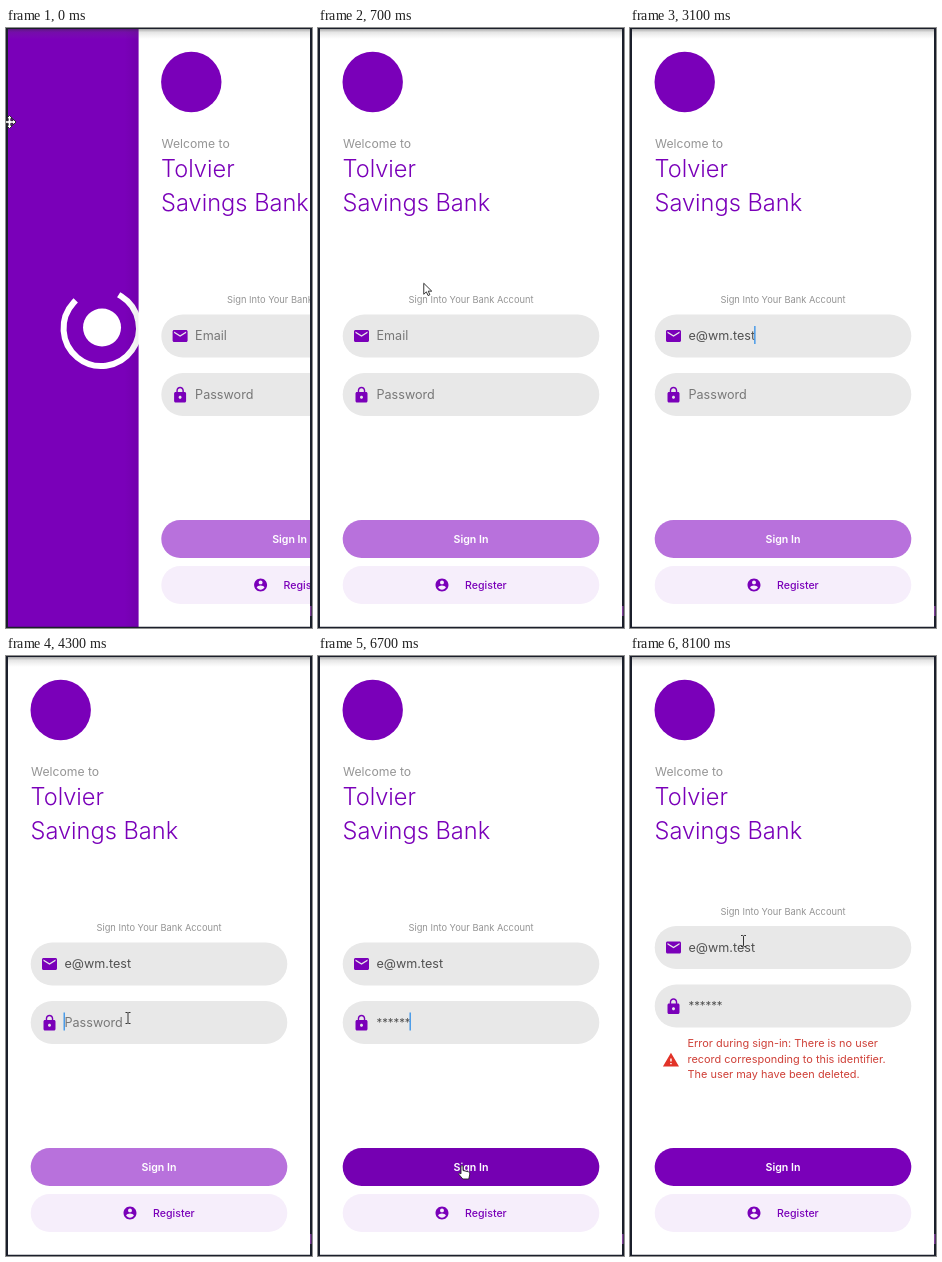
An HTML page that plays this animation: 306x600 px, repeating every 8200 ms.

```html
<!DOCTYPE html>
<html lang="en">
<head>
<meta charset="utf-8">
<title>Sign in</title>
<style>
  html, body { margin: 0; width: 100%; height: 100%; overflow: hidden; background: #fff; }
  svg { display: block; width: 306px; height: 600px; font-family: Inter, Roboto, sans-serif; }
  .accent { fill: #7a00b9; }
  .grey { fill: #959595; }
  .field { fill: #e8e8e8; }
  .title { font-size: 23.6px; font-weight: 350; }
  .input { font-size: 12.6px; }
  .error { font-size: 10.95px; fill: #cf4038; }
  .cursor path { stroke-linejoin: round; }
</style>
</head>
<body>
<svg viewBox="0 0 306 600">
  <defs>
    <linearGradient id="topShade" x2="0" y2="1">
      <stop stop-color="#222" stop-opacity=".5"/>
      <stop offset=".4" stop-color="#555" stop-opacity=".15"/>
      <stop offset="1" stop-color="#777" stop-opacity="0"/>
    </linearGradient>
    <linearGradient id="sideShade">
      <stop stop-color="#000" stop-opacity="0"/>
      <stop offset="1" stop-color="#000" stop-opacity=".07"/>
    </linearGradient>
  </defs>

  <rect class="accent" width="306" height="600"/>
  <g id="splash">
    <path id="arc" fill="none" stroke="#fff" stroke-width="6" stroke-linecap="square"/>
    <circle cx="153.5" cy="299.5" r="19" fill="#fff"/>
  </g>

  <g id="page">
    <rect x="-12" width="14" height="600" fill="url(#sideShade)"/>
    <rect x="2" width="306" height="600" fill="#fff"/>
    <circle class="accent" cx="54.7" cy="54" r="30.2"/>
    <text class="grey" x="25" y="119.5" font-size="12.2">Welcome to</text>
    <text class="accent title" x="24.5" y="149">Tolvier</text>
    <text class="accent title" x="24.5" y="183">Savings Bank</text>

    <g id="form">
      <text class="grey" x="153" y="275" font-size="9.3" text-anchor="middle">Sign Into Your Bank Account</text>
      <rect class="field" x="24.7" y="286.5" width="256.6" height="43" rx="21.5"/>
      <path class="accent" transform="translate(34.5 299) scale(.75)" d="M20 4H4c-1.1 0-2 .9-2 2v12c0 1.1.9 2 2 2h16c1.1 0 2-.9 2-2V6c0-1.1-.9-2-2-2zm0 4l-8 5-8-5V6l8 5 8-5v2z"/>
      <text class="input" id="email" x="58.5" y="312"></text>
      <rect class="field" x="24.7" y="345" width="256.6" height="43" rx="21.5"/>
      <path class="accent" transform="translate(34.5 358) scale(.75)" d="M18 8h-1V6c0-2.76-2.24-5-5-5S7 3.24 7 6v2H6c-1.1 0-2 .9-2 2v10c0 1.1.9 2 2 2h12c1.1 0 2-.9 2-2V10c0-1.1-.9-2-2-2zm-6 9c-1.1 0-2-.9-2-2s.9-2 2-2 2 .9 2 2-.9 2-2 2zm3.1-9H8.9V6c0-1.71 1.39-3.1 3.1-3.1 1.71 0 3.1 1.39 3.1 3.1v2z"/>
      <text class="input" id="password" x="58.5" y="370.5"></text>
      <rect id="caret" width="1.5" height="18" fill="#4a9be8"/>
    </g>

    <g id="error">
      <path fill="#e23328" transform="translate(32.2 395.2) scale(.73)" d="M1 21h22L12 2 1 21zm12-3h-2v-2h2v2zm0-4h-2v-4h2v4z"/>
      <text class="error" x="57.5" y="390.7">Error during sign-in: There is no user</text>
      <text class="error" x="57.5" y="406.5">record corresponding to this identifier.</text>
      <text class="error" x="57.5" y="422.3">The user may have been deleted.</text>
    </g>

    <rect id="button" x="24.7" y="492" width="256.6" height="38" rx="19"/>
    <text x="153" y="514.7" font-size="10.6" font-weight="600" fill="#fff" text-anchor="middle">Sign In</text>
    <rect x="24.7" y="538" width="256.6" height="38" rx="19" fill="#f6eefb"/>
    <path class="accent" transform="translate(116.2 549.2) scale(.65)" d="M12 2C6.48 2 2 6.48 2 12s4.48 10 10 10 10-4.48 10-10S17.52 2 12 2zm0 3c1.66 0 3 1.34 3 3s-1.34 3-3 3-3-1.34-3-3 1.34-3 3-3zm0 14.2c-2.5 0-4.71-1.28-6-3.22.03-1.99 4-3.08 6-3.08 1.99 0 5.97 1.09 6 3.08-1.29 1.94-3.5 3.22-6 3.22z"/>
    <text class="accent" x="147" y="560.6" font-size="10.6" font-weight="500">Register</text>
  </g>

  <rect width="306" height="11" fill="url(#topShade)"/>
  <path fill="#1b1f2b" d="M0 0H306V600H0ZM2 1V598.8H304V1Z" fill-rule="evenodd"/>
  <rect x="304" y="578" width="1.5" height="10" fill="#7c3f95"/>

  <g class="cursor" id="cursor">
    <path id="move" fill="#fff" stroke="#222" stroke-width=".9" d="M0-6.5L3-3.5H1.3V-1.3H3.5V-3L6.5 0 3.5 3V1.3H1.3V3.5H3L0 6.5-3 3.5H-1.3V1.3H-3.5V3L-6.5 0-3.5-3V-1.3H-1.3V-3.5H-3Z"/>
    <path id="arrow" fill="#fff" stroke="#222" stroke-width=".9" d="M0 0V11L2.6 8.6 4.3 12.3 6.1 11.5 4.5 7.9H8Z"/>
    <path id="beam" fill="none" stroke="#333" d="M-2.5-5.5H-.8L0-4.8.8-5.5H2.5M0-4.8V4.8M-2.5 5.5H-.8L0 4.8.8 5.5H2.5"/>
    <path id="hand" fill="#fff" stroke="#222" stroke-width=".9" d="M-1 0Q0-1 1 0V4.5L6.5 5.8Q8 6.3 7.8 8L6.8 13H0.8L-3.4 8Q-3.2 6.3-1 7.8Z"/>
  </g>
</svg>
<script>
const LOOP = 8200, STEP = 100;
const SUBMIT = 6900, FAIL = 7300;
const $ = id => document.getElementById(id);
const show = (id, on) => $(id).setAttribute('display', on ? 'inline' : 'none');
const shift = (id, x, y) => $(id).setAttribute('transform', `translate(${x} ${y})`);

const email = {
  id: 'email', hint: 'Email', value: 'e@wm.test', y: 298, focus: 1100, blur: 4000,
  keys: [1500, 1900, 2300, 2600, 2700, 2900, 3000, 3000, 3100]
};
const password = {
  id: 'password', hint: 'Password', value: '******', y: 356.5, focus: 4000, blur: SUBMIT,
  keys: [4700, 4900, 5100, 5600, 5800, 6200]
};

// Pointer strokes: visible from the first to the last time, each point is [time, x, y].
const strokes = [
  [[0, 3.5, 94], [100, 3, 97], [900, 140, 308], [1400, 140, 308]],
  [[3600, 126, 308], [4000, 122, 362], [4600, 122, 362]],
  [[6300, 122, 362], [6600, 144, 510], [7700, 144, 510], [8100, 113.5, 285]]
];

function arcPath(cx, cy, r, from, to) {
  const at = deg => {
    const a = deg * Math.PI / 180;
    return `${cx + r * Math.cos(a)} ${cy + r * Math.sin(a)}`;
  };
  return `M${at(from)}A${r} ${r} 0 1 1 ${at(to)}`;
}

function pointer(t) {
  const stroke = strokes.find(s => t >= s[0][0] && t <= s[s.length - 1][0]);
  if (!stroke) return null;
  const i = Math.max(1, stroke.findIndex(p => p[0] >= t));
  const [t0, x0, y0] = stroke[i - 1], [t1, x1, y1] = stroke[i];
  const k = (t - t0) / (t1 - t0);
  return { x: x0 + (x1 - x0) * k, y: y0 + (y1 - y0) * k };
}

function drawField(f, t) {
  const el = $(f.id);
  const count = f.keys.filter(k => k <= t).length;
  el.textContent = count ? f.value.slice(0, count) : f.hint;
  el.setAttribute('fill', count ? '#505050' : '#777');
  el.style.fontSize = f === password && count ? '11.3px' : '';
  if (t < f.focus || t >= f.blur) return;
  const last = count ? f.keys[count - 1] : f.focus;
  const width = count ? el.getComputedTextLength() : 0;
  $('caret').setAttribute('x', 57.5 + width);
  $('caret').setAttribute('y', f.y);
  show('caret', (t - last) % 1000 <= 500);
}

function drawCursor(t, lift) {
  const p = pointer(t);
  show('cursor', p);
  const inside = (top, height) => p && p.x > 25 && p.x < 281 && p.y >= top && p.y <= top + height;
  const hover = inside(492, 38);
  if (p) {
    const overText = inside(286.5 + lift, 43) || inside(345 + lift, 43);
    const kind = t < 100 ? 'move' : hover ? 'hand' : overText ? 'beam' : 'arrow';
    for (const id of ['move', 'arrow', 'beam', 'hand']) show(id, id === kind);
    shift('cursor', p.x, p.y);
  }
  return hover;
}

function draw(t) {
  const slide = t < 100 ? 130.6 : t < 200 ? 8.9 : 0;
  shift('page', slide, 0);
  shift('splash', (slide - 303) / 3, 0);

  const failed = t >= FAIL, lift = failed ? -16.5 : 0;
  shift('form', 0, lift);
  show('error', failed);
  show('caret', false);
  drawField(email, t);
  drawField(password, t);

  const hover = drawCursor(t, lift);
  const ready = t >= password.keys[0];
  $('button').setAttribute('fill', !ready ? '#b871dc' : hover ? '#7500b2' : '#7a00b9');
}

$('arc').setAttribute('d', arcPath(152.7, 300.3, 37.7, -58, -137));
const start = performance.now();
function tick() {
  const t = (performance.now() - start) % LOOP;
  draw(Math.floor(t / STEP) * STEP);
  requestAnimationFrame(tick);
}
tick();
</script>
</body>
</html>
```
